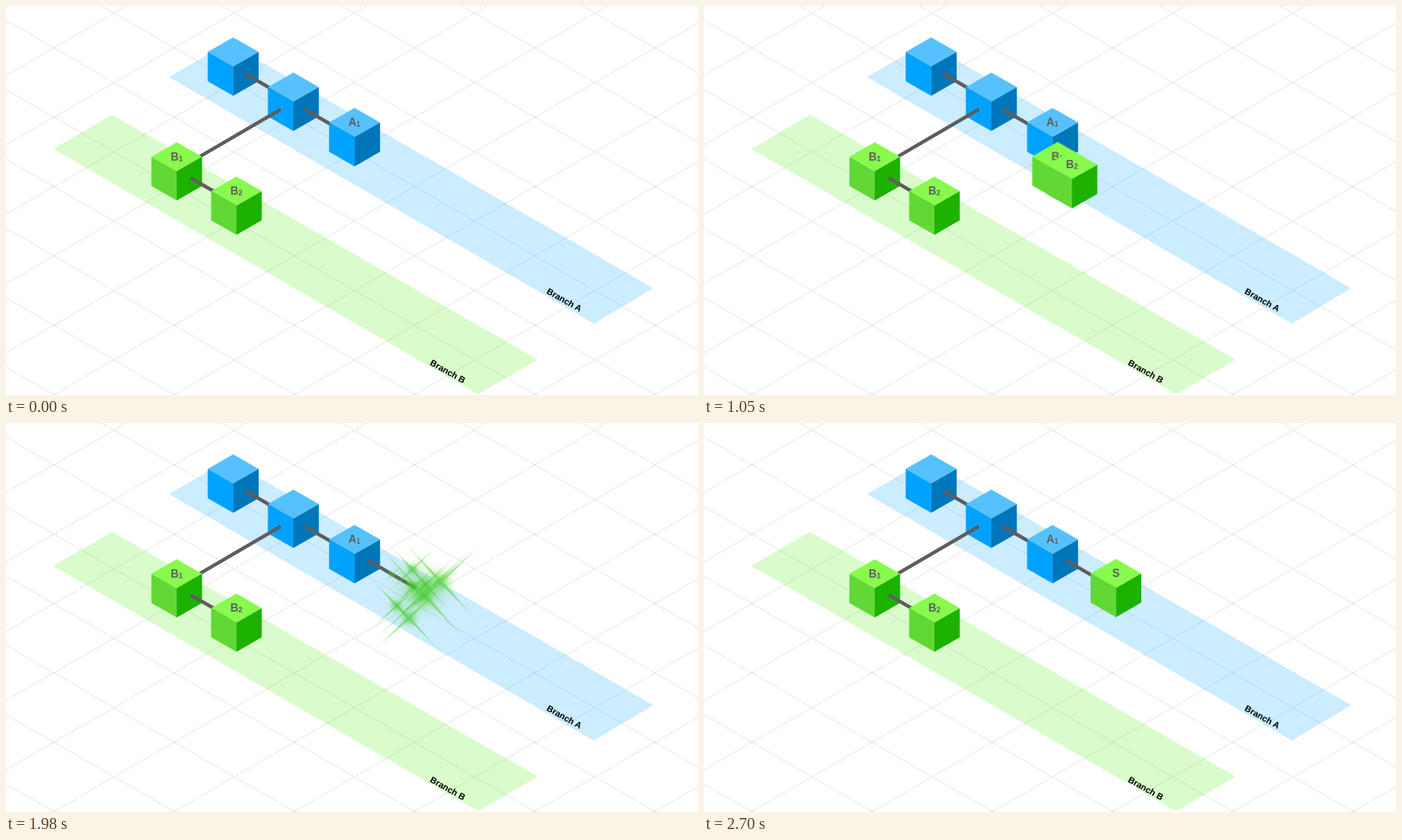
An HTML page for the animation above (3180 ms loop, 997 by 561 pixels).

```html
<!DOCTYPE html>
<html lang="en">
<head>
<meta charset="utf-8">
<title>Squash merge</title>
<style>
  html, body { margin: 0; width: 100%; height: 100%; overflow: hidden; background: #fff; }
  svg { display: block; width: 100vw; height: 100vh; }
  text { font: bold 16px "Liberation Sans", Arial, sans-serif; fill: #5e5e5e; text-anchor: middle; }
  .sub { font-size: 10.5px; }
  .lane { font-size: 12.6px; fill: #000; text-anchor: start; }
  .link { stroke: #5e5e5e; stroke-width: 5; }

  .copy1, .copy2, .wire, .merged, .star, .glow, .glint {
    animation: 3180ms linear infinite;
  }
  .copy1 { animation-name: copy1; }
  .copy2 { animation-name: copy2; }
  .wire { animation-name: wire; stroke-dasharray: 1 2; }
  .merged { animation-name: merged; }
  .star { animation-name: star; }
  .glow { animation-name: glow; }
  .glint { animation-name: glint; }

  /* both copies slide to the same spot */
  @keyframes copy1 {
    0%, 14.79% { opacity: 0; transform: translate(246px, 238.5px); }
    14.8% { opacity: 1; transform: translate(246px, 238.5px); animation-timing-function: cubic-bezier(.37, 0, .63, 1); }
    42% { opacity: 1; transform: translate(593.5px, 237.7px); }
    42.01%, 100% { opacity: 0; transform: translate(593.5px, 237.7px); }
  }
  @keyframes copy2 {
    0%, 14.79% { opacity: 0; transform: translate(332px, 288px); }
    14.8% { opacity: 1; transform: translate(332px, 288px); animation-timing-function: cubic-bezier(.37, 0, .63, 1); }
    42%, 43.4% { opacity: 1; transform: translate(593.5px, 237.7px); }
    49%, 100% { opacity: 0; transform: translate(593.5px, 237.7px); }
  }
  @keyframes wire {
    0%, 48.99% { opacity: 0; stroke-dashoffset: 1; }
    49% { opacity: 1; stroke-dashoffset: 1; animation-timing-function: cubic-bezier(.37, 0, .63, 1); }
    64%, 100% { opacity: 1; stroke-dashoffset: 0; }
  }
  @keyframes merged {
    0%, 65% { opacity: 0; }
    67.9% { opacity: .22; }
    73.6% { opacity: .8; }
    83%, 100% { opacity: 1; }
  }
  @keyframes star {
    0%, 51% { opacity: 0; transform: rotate(-95deg) scale(.02); }
    55.66% { opacity: .9; transform: rotate(-70deg) scale(.22); }
    67.9% { opacity: .5; transform: rotate(-20deg) scale(1.35); }
    73.6% { opacity: .42; transform: rotate(-9deg) scale(1.65); }
    83%, 100% { opacity: 0; transform: rotate(-2deg) scale(1.9); }
  }
  @keyframes glow {
    0%, 55% { opacity: 0; transform: scale(.25); }
    67.9% { opacity: .85; transform: scale(.9); }
    73.6% { opacity: .6; transform: scale(1.1); }
    84.8%, 100% { opacity: 0; transform: scale(1.1); }
  }
  @keyframes glint {
    0%, 62% { opacity: 0; transform: rotate(-40deg) scale(.04); }
    67.9% { opacity: .9; transform: rotate(-20deg) scale(.12); }
    72%, 100% { opacity: 0; transform: rotate(-10deg) scale(.14); }
  }
</style>
</head>
<body>
<svg viewBox="0 0 997 561" preserveAspectRatio="none">
  <defs>
    <pattern id="grid" width="173.2" height="100" patternUnits="userSpaceOnUse" patternTransform="translate(69 460.400)">
      <path d="M0 0L173.200 100M0 100L173.200 0" fill="none" stroke="#d8d8d8" stroke-width="1.3" stroke-dasharray="2 1.3"/>
    </pattern>
    <radialGradient id="halo">
      <stop offset="0" stop-color="#35c516" stop-opacity=".85"/>
      <stop offset=".42" stop-color="#4ccc33" stop-opacity=".5"/>
      <stop offset=".65" stop-color="#6cdc50" stop-opacity=".25"/>
      <stop offset="1" stop-color="#88fa4e" stop-opacity="0"/>
    </radialGradient>
    <radialGradient id="fade" gradientUnits="userSpaceOnUse" cx="0" cy="0" r="100">
      <stop offset="0" stop-color="#3cc81e"/>
      <stop offset=".35" stop-color="#4fd02f" stop-opacity=".75"/>
      <stop offset="1" stop-color="#6cdc50" stop-opacity=".15"/>
    </radialGradient>
    <g id="blue">
      <path fill="#56c1ff" d="M0-42L36.700-21L0 0L-36.700-21Z"/>
      <path fill="#00a2ff" d="M-36.700-21L0 0V42.200L-36.700 21.200Z"/>
      <path fill="#0076ba" d="M36.700-21L0 0V42.200L36.700 21.200Z"/>
    </g>
    <g id="green">
      <path fill="#88fa4e" d="M0-42L36.500-21L0 0L-36.500-21Z"/>
      <path fill="#61d836" d="M-36.500-21L0 0V42L-36.500 21Z"/>
      <path fill="#1db100" d="M36.500-21L0 0V42L36.500 21Z"/>
    </g>
    <g id="b1">
      <use href="#green"/>
      <text y="-16">B<tspan class="sub" dy="1">1</tspan></text>
    </g>
    <g id="b2">
      <use href="#green"/>
      <text y="-16">B<tspan class="sub" dy="1">2</tspan></text>
    </g>
    <path id="rays" d="M0-100L2.400-2.400L100 0L2.400 2.400L0 100L-2.400 2.400L-100 0L-2.400-2.400Z"/>
    <g id="spark">
      <use href="#rays" fill="url(#fade)"/>
      <circle r="26" fill="url(#halo)"/>
    </g>
  </defs>

  <rect width="997" height="561" fill="url(#grid)"/>
  <path fill="#00a2ff" fill-opacity=".2" d="M235 102.500L320 53L932.500 407L847 458Z"/>
  <path fill="#46f000" fill-opacity=".2" d="M68 206L153 157L766 510L680 560Z"/>
  <text class="lane" transform="translate(778 414) rotate(29.500)">Branch A</text>
  <text class="lane" transform="translate(610 517) rotate(29.500)">Branch B</text>

  <use href="#blue" x="327.300" y="87.300"/>
  <path class="link" d="M344.500 97.500L414 138"/>
  <use href="#blue" x="414" y="138"/>
  <path class="link" d="M430 149L502 190"/>
  <path class="link" d="M396 149L246 236.500"/>
  <use href="#blue" x="502.200" y="189"/>
  <text x="502" y="172.500">A<tspan class="sub" dy="1">1</tspan></text>
  <path class="link wire" pathLength="1" d="M522 198.300L593 239.500"/>

  <g class="copy1"><use href="#b1"/></g>
  <use href="#b1" x="246" y="238.500"/>
  <path class="link" d="M266 248L332 286"/>
  <use href="#b2" x="332" y="288"/>
  <g class="copy2"><use href="#b2"/></g>

  <g transform="translate(593.500 238)">
    <g class="merged">
      <use href="#green"/>
      <text y="-16">S</text>
    </g>
    <g transform="translate(4 2)"><circle class="glow" r="82" fill="url(#halo)"/></g>
    <g transform="translate(-8 -27) scale(.6)"><use class="star" href="#spark"/></g>
    <g transform="translate(33 -9)"><use class="star" href="#spark"/></g>
    <g transform="translate(8 9) scale(1.200)"><use class="star" href="#spark"/></g>
    <g transform="translate(-13 43) scale(.85)"><use class="star" href="#spark"/></g>
    <g transform="translate(-31 26) scale(.65)"><use class="star" href="#spark"/></g>
    <g transform="translate(11 -5) scale(.7)"><use class="star" href="#spark"/></g>
    <g transform="translate(-7 -1) scale(.6)"><use class="star" href="#spark"/></g>
    <g transform="translate(-38 -19) scale(.3)"><use class="star" href="#spark"/></g>
    <g transform="translate(34 -7)"><use class="glint" href="#rays" fill="#fff" stroke="#fff" stroke-width="10"/></g>
  </g>
</svg>
</body>
</html>
```
